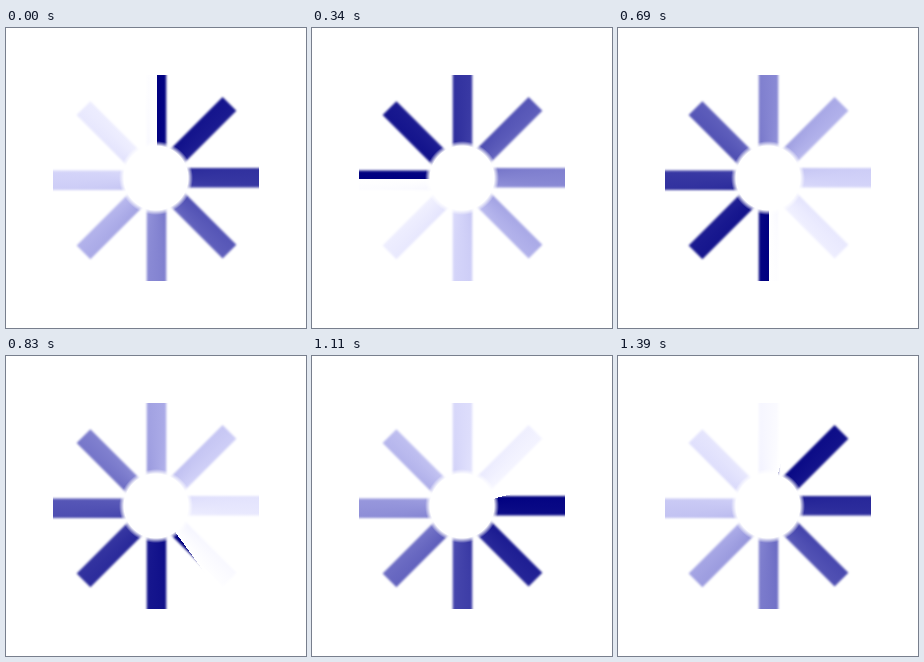
Animation of 300x300 px, one loop 1460 ms. Source, as an HTML page with a canvas:

```html
<!DOCTYPE html>
<html lang="en">
<head>
<meta charset="utf-8">
<title>Spinner</title>
<style>
  html, body { margin: 0; width: 100%; height: 100%; overflow: hidden; background: #fff; }
  canvas { display: block; }
</style>
</head>
<body>
<canvas id="stage" width="300" height="300"></canvas>
<script>
const ctx = document.getElementById('stage').getContext('2d');
const LOOP = 1460, STEP = 70, CENTER = 151;

// Step and counter-clockwise angle of the sweep
const keys = [[0, 0], [3, 51], [5, 90], [15, 270], [21, 360]];

function angleAt(step) {
  const i = keys.findIndex(key => key[0] > step);
  const [s0, a0] = keys[i - 1], [s1, a1] = keys[i];
  return a0 + (a1 - a0) * (step - s0) / (s1 - s0);
}

// Navy to white, p from 0 to 1
function shade(p) {
  const ease = (lift, bend) =>
    p + lift * Math.sin(Math.PI * p) - bend * Math.sin(2 * Math.PI * p);
  const red = 255 * ease(0.02, 0.055);
  const blue = 128 + 127 * ease(0.146, 0.09);
  return `rgb(${red}, ${red}, ${blue})`;
}

// Eight soft-edged spokes around an empty hub
function makeMask() {
  const mask = document.createElement('canvas');
  mask.width = mask.height = 300;
  const m = mask.getContext('2d');
  m.lineWidth = 19.5;
  m.filter = 'blur(0.8px)';
  m.beginPath();
  for (let i = 0; i < 8; i++) {
    const dx = Math.round(Math.cos(i * Math.PI / 4));
    const dy = Math.round(Math.sin(i * Math.PI / 4));
    const reach = dx && dy ? 73 : 110;
    // The spokes do not quite meet in one point
    const x = 150.5, y = 151 - dx * (1.25 - 0.8 * dy);
    m.moveTo(x, y);
    m.lineTo(x + dx * reach, y + dy * reach);
  }
  m.stroke();
  m.filter = 'none';

  const hub = m.createRadialGradient(150, 150, 32, 150, 150, 37);
  hub.addColorStop(0, '#000');
  hub.addColorStop(1, '#0000');
  m.globalCompositeOperation = 'destination-out';
  m.fillStyle = hub;
  m.fillRect(0, 0, 300, 300);
  return mask;
}

const mask = makeMask();

function draw(time) {
  const t = time % LOOP;
  // The third step is 10 ms shorter than the others
  const step = Math.floor((t < 200 ? t : t + 10) / STEP);
  const start = -(angleAt(step) + 90) * Math.PI / 180;
  const sweep = ctx.createConicGradient(start, CENTER, CENTER);
  for (let p = 0; p <= 1; p += 1 / 16) sweep.addColorStop(p, shade(p));

  ctx.clearRect(0, 0, 300, 300);
  ctx.globalCompositeOperation = 'source-over';
  ctx.fillStyle = sweep;
  ctx.fillRect(47, 47, 206, 206);
  ctx.globalCompositeOperation = 'destination-in';
  ctx.drawImage(mask, 0, 0);
}

const begin = performance.now();
function tick() {
  draw(performance.now() - begin);
  requestAnimationFrame(tick);
}
tick();
</script>
</body>
</html>
```
